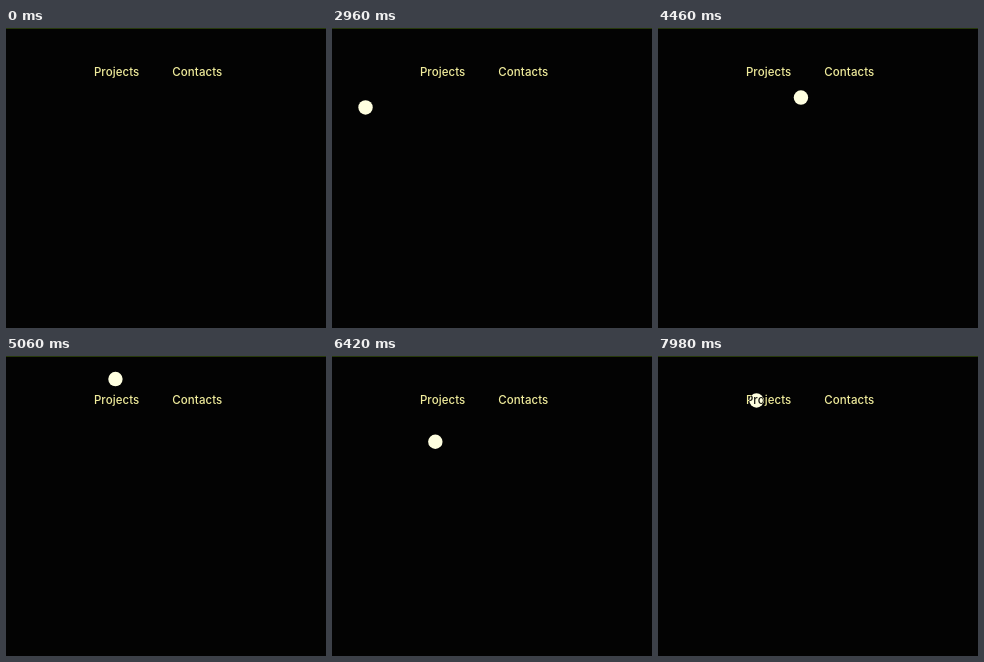
Recreate the animation shown at these times as an HTML page. Size 320 px wide and 300 px high, loop 8 s.

```html
<!DOCTYPE html>
<html lang="en">
<head>
<meta charset="utf-8">
<title>Cursor</title>
<style>
  html, body { margin: 0; width: 100%; height: 100%; overflow: hidden; background: #030303; }
  svg { display: block; width: 320px; height: 300px; }
  text { font: 500 11.5px Inter, "Open Sans", sans-serif; letter-spacing: .08px; }
</style>
</head>
<body>
<svg viewBox="0 0 320 300">
  <defs>
    <circle id="dot" r="7.2"/>
    <clipPath id="inside"><use href="#dot"/></clipPath>
    <g id="menu">
      <text x="87.9" y="48.3">Projects</text>
      <text x="166.3" y="48.3">Contacts</text>
    </g>
  </defs>
  <rect width="320" height="300" fill="#030303"/>
  <rect width="320" height="1" fill="#26380a"/>
  <use href="#menu" fill="#f0ec9c"/>
  <use href="#dot" fill="#ffffe0"/>
  <use href="#menu" fill="#14140c" clip-path="url(#inside)"/>
</svg>
<script>
const LOOP = 8000;
const dot = document.getElementById('dot');

const mix = (a, b, u) => a + (b - a) * u;
const smooth = u => u * u * (3 - 2 * u);
const easeOut = u => 1 - (1 - u) ** 2;

// Enters from the left edge and settles below the menu.
const glide = u => [mix(-3, 100.5, u), mix(77, 85.5, smooth(u))];

// One counterclockwise turn around the first menu item, tightening slightly.
function orbit(u) {
  const turned = u + 0.08 * Math.sin(Math.PI * u);
  const angle = mix(100, -274, turned) * Math.PI / 180;
  return [107.6 + (41 - 5 * u) * Math.cos(angle), 54.5 + 31.5 * Math.sin(angle)];
}

// Climbs into the word, drifting right.
const climb = u => [mix(110.1, 119.5, u * u), mix(85.9, 45.5, easeOut(u))];

// Sweeps back left across the letters.
const sweep = u => [mix(119.5, 98.5, smooth(u)), mix(45.5, 44.5, u) - 3.5 * Math.sin(2 * Math.PI * u)];

const strokes = [
  { from: 58, to: 75, move: glide },
  { from: 87, to: 139, move: orbit },
  { from: 139, to: 157, move: climb },
  { from: 157, to: 171, move: sweep }
];

// The picture advances three steps per 140 ms, unevenly spaced.
function stepAt(ms) {
  const phase = ms % 140;
  return 3 * Math.floor(ms / 140) + (phase >= 120 ? 2 : phase >= 20 ? 1 : 0);
}

function render(ms) {
  const step = stepAt(ms);
  const stroke = strokes.filter(s => s.from <= step).pop();
  const [x, y] = stroke
    ? stroke.move(Math.min((step - stroke.from) / (stroke.to - stroke.from), 1))
    : [-20, 77];
  dot.setAttribute('cx', x.toFixed(2));
  dot.setAttribute('cy', y.toFixed(2));
}

const start = performance.now();
function tick() {
  render((performance.now() - start) % LOOP);
  requestAnimationFrame(tick);
}
tick();
</script>
</body>
</html>
```
